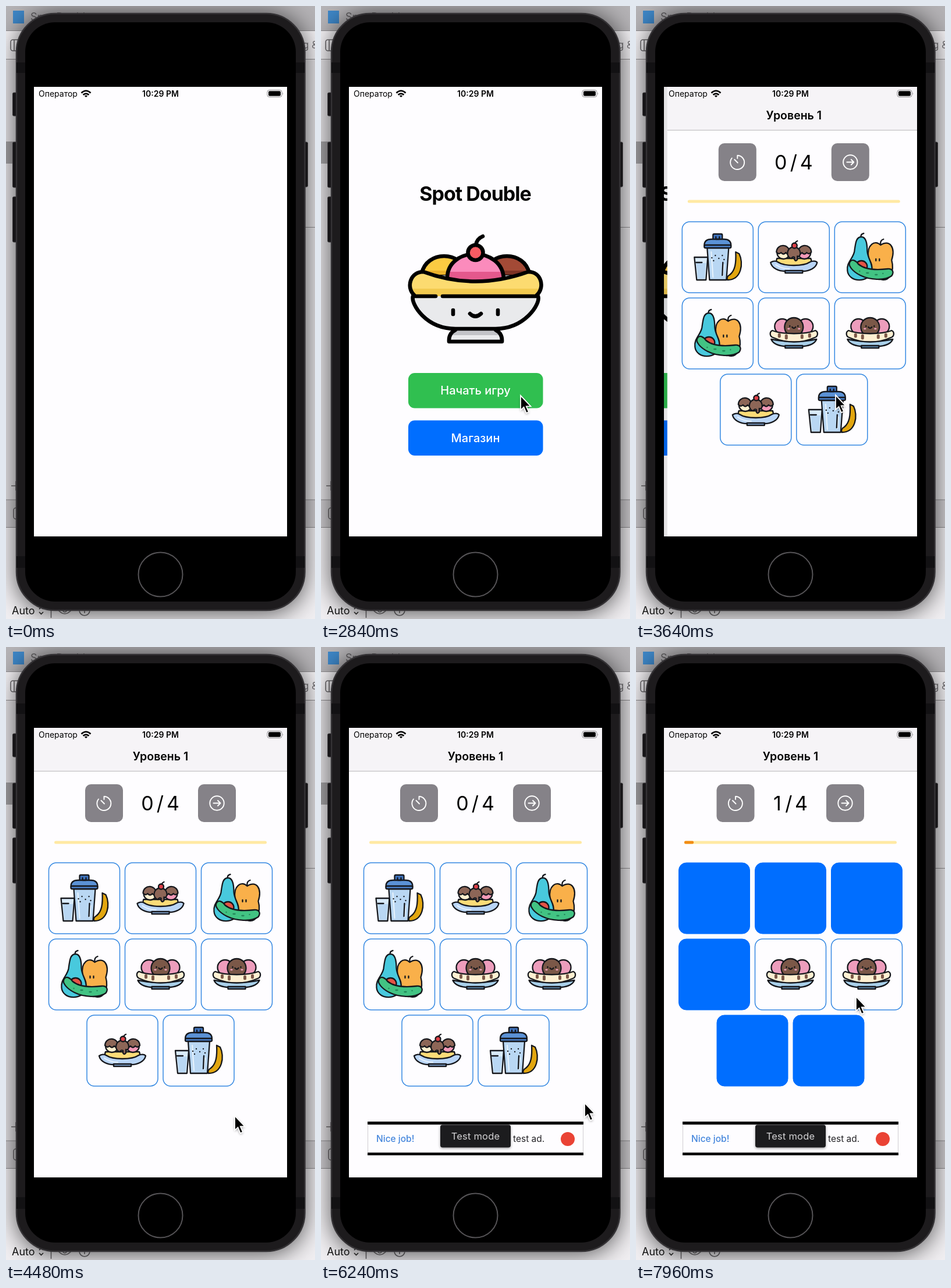
An HTML page for the animation above (8 s loop, 531x1054 px).

```html
<!DOCTYPE html>
<html lang="ru">
<head>
<meta charset="utf-8">
<title>Memory game</title>
<style>
  html, body { margin: 0; width: 100%; height: 100%; overflow: hidden; background: #e4e2e5; }
  svg { display: block; width: 100%; height: 100%; font-family: Inter, Roboto, sans-serif; }
  .mid { text-anchor: middle; }
  .ink { stroke: #15171c; stroke-width: 2.3; stroke-linejoin: round; stroke-linecap: round; }
  .bold { stroke: #000; stroke-width: 6.6; stroke-linejoin: round; stroke-linecap: round; }
  .line { fill: none; }
  .sym { fill: none; stroke: #fff; stroke-width: 1.9; stroke-linecap: round; stroke-linejoin: round; }
</style>
</head>
<body>
<svg viewBox="0 0 531 1054">
  <defs>
    <filter id="blur" x="-30%" y="-20%" width="160%" height="140%"><feGaussianBlur stdDeviation="21"/></filter>
    <filter id="soft" x="-50%" y="-50%" width="200%" height="200%"><feGaussianBlur stdDeviation="2"/></filter>
    <clipPath id="screen"><rect x="48" y="139" width="435" height="773"/></clipPath>
    <clipPath id="scoop"><path d="M217 470C215 412 313 412 314 470Q265 484 217 470Z"/></clipPath>
    <clipPath id="fruit"><path d="M176 457Q265 490 356 457C386 455 388 499 360 499H172C144 499 146 455 176 457Z"/></clipPath>

    <g id="shaker" class="ink">
      <path fill="#d9ebfa" d="M-40 0H-17L-20 39H-36Z"/>
      <path fill="#b9d7f3" stroke="none" d="M-37 10H-20L-22 37H-34Z"/>
      <path class="line" d="M-37 9H-27"/>
      <path fill="#e2a60f" d="M31 -9L37 -6C45 10 41 39 17 39C15 36 17 32 21 30C30 23 32 10 31 -9Z"/>
      <path fill="#b9d7f3" d="M-18 -16H19L15 39H-14Z"/>
      <path class="line" stroke="#e4f1fc" d="M-11 -9L-8 34M11 13L9 32"/>
      <path class="line" d="M-10 1h.1M-4 -3h.1M2 2h.1M8 -3h.1M-7 6h.1M11 4h.1M9 9L8 31"/>
      <rect x="-8" y="-40" width="16" height="11" rx="2" fill="#3f73bd"/>
      <path fill="#5b92d6" d="M-23 -20C-23 -29 -17 -31 -11 -31H11C17 -31 23 -29 23 -20Z"/>
      <rect x="-23" y="-21" width="46" height="5" rx="2" fill="#4a80c8"/>
      <path class="line" d="M-3 -35V-31H3V-35"/>
    </g>

    <g id="sundae" class="ink">
      <path fill="#fbdc78" d="M-29 2C-34 14 -20 17 0 17S34 14 29 2Z"/>
      <circle cx="-18" cy="-8" r="11" fill="#fff0cf"/>
      <circle cx="18" cy="-8" r="11" fill="#f39ab8"/>
      <path fill="#8d6657" d="M-30 -9C-29 -24 -8 -24 -7 -8Q-11 -4 -14 -8Q-18 -3 -22 -8Q-26 -4 -30 -9Z"/>
      <path fill="#8d6657" d="M30 -9C29 -24 8 -24 7 -8Q11 -4 14 -8Q18 -3 22 -8Q26 -4 30 -9Z"/>
      <path fill="#8d6657" d="M-11 -5C-12 -22 12 -22 11 -5Q8 1 6 -2V4Q3 8 1 4V0Q-2 -2 -4 2Q-9 2 -11 -5Z"/>
      <circle cx="1" cy="-20" r="4.5" fill="#dd4048"/>
      <path class="line" d="M2 -24Q3 -27 6 -28"/>
      <path fill="#b9d5f6" d="M-40 9C-36 6 -31 6 -28 8C-16 16 16 16 28 8C32 6 38 6 40 9C38 19 26 24 15 24H-15C-26 24 -38 19 -40 9Z"/>
      <path class="line" stroke="#e2effd" d="M-31 13Q-20 20 -8 20"/>
      <path fill="#8fb5e4" d="M-15 23H15V27H-15Z"/>
    </g>

    <g id="veg" class="ink">
      <path fill="#f9b04a" d="M18 -21C8 -31 -6 -21 -3 0C-4 25 4 40 18 38C34 43 42 23 37 5C44 -17 34 -31 18 -21Z"/>
      <path class="line" d="M18 -22Q17 -29 23 -31M10 3V6M16 3V6"/>
      <path fill="#48c9dd" d="M-15 -35C-24 -35 -25 -25 -27 -10C-29 2 -41 9 -39 23C-37 44 -1 45 3 23C5 9 -4 4 -5 -11C-5 -25 -7 -35 -15 -35Z"/>
      <path class="line" d="M-16 -35Q-16 -40 -11 -41"/>
      <circle cx="-15" cy="16" r="10" fill="#e55345"/>
      <path fill="#42c383" d="M-34 7C-40 14 -29 25 -17 31C-1 39 25 41 37 32C42 25 38 19 30 20C14 22 -8 22 -20 12C-25 5 -31 3 -34 7Z"/>
      <path class="line" stroke="#24875a" d="M-18 24h.1M-6 27h3M9 30h3M22 28h.1"/>
    </g>

    <g id="split" class="ink">
      <circle cx="-20" cy="-12" r="13" fill="#ed9dbc"/>
      <circle cx="20" cy="-12" r="13" fill="#ed9dbc"/>
      <circle cy="-11" r="16" fill="#7b5848"/>
      <path class="line" d="M-7 -13v1M7 -13v1M-3 -11Q0 -7 3 -11"/>
      <path class="line" stroke="#ed9dbc" d="M-10 -8h2M8 -8h2"/>
      <path fill="#a9d0ea" d="M-39 10Q0 18 39 10Q35 20 17 22H-17Q-35 20 -39 10Z"/>
      <path fill="#fff0d2" d="M-37 -5C-42 -3 -42 5 -36 7C-15 17 15 17 36 7C42 5 42 -3 37 -5C20 2 -20 2 -37 -5Z"/>
      <path class="line" stroke="#7b5848" stroke-width="5" d="M-25 2V5M-13 4V8M14 4V7M27 2V5"/>
      <path fill="#6f9fc6" d="M-15 21H15V25H-15Z"/>
    </g>
  </defs>

  <!-- desktop window behind the phone -->
  <rect width="531" height="1054" fill="#e4e2e5"/>
  <rect width="531" height="42" fill="#b4b2b5"/>
  <rect y="43" width="531" height="48" fill="#f3f1f4"/>
  <rect y="849" width="531" height="47" fill="#cfcdd0"/>
  <rect y="897" width="531" height="157" fill="#f0eef1"/>
  <path d="M0 42.5H531M0 91.5H531M514 380.5H531M0 849H531M0 896.5H531" stroke="#8c8a8d"/>
  <rect y="233" width="20" height="38" fill="#a19fa2"/>
  <rect x="12" y="8" width="19" height="22" fill="#3e86c6"/>
  <text x="42" y="25" font-size="18" fill="#626063">Spot Double</text>
  <text x="510" y="73" font-size="17" fill="#747276">g &amp;</text>
  <g fill="none" stroke="#69676a" stroke-width="1.6">
    <rect x="8" y="58" width="20" height="19" rx="4"/><path d="M14 58V77M9 825H25M17 817V833"/>
    <rect x="13" y="863" width="18" height="19" rx="4"/>
    <path d="M77.5 1025V1052M90 1039Q101 1027 112 1039Q101 1051 90 1039Z"/>
    <circle cx="101" cy="1039" r="3"/><circle cx="135" cy="1039" r="9"/><path d="M135 1037V1044"/>
  </g>
  <rect x="18" y="14" width="496" height="1030" rx="66" fill="#000" opacity=".66" filter="url(#blur)"/>
  <text x="10" y="1046" font-size="18" fill="#111">Auto</text>
  <path d="M57 1037L60.500 1033.500L64 1037M57 1042L60.500 1045.500L64 1042" fill="none" stroke="#222" stroke-width="1.7"/>

  <!-- phone -->
  <g fill="#161517" stroke="#39373a">
    <rect x="11.500" y="149" width="10" height="40" rx="2"/>
    <rect x="11.500" y="234" width="10" height="78" rx="2"/>
    <rect x="11.500" y="328" width="10" height="78" rx="2"/>
    <rect x="508" y="234" width="10.500" height="77" rx="2"/>
  </g>
  <rect x="18" y="13" width="495.500" height="1026" rx="66" fill="#1d1b1d" stroke="#343235" stroke-width="2.500"/>
  <path d="M18 97H33V115H18ZM498 97H513V115H498ZM18 946H33V966H18ZM498 946H513V966H498Z" fill="#121113"/>
  <rect x="33" y="28" width="465" height="996" rx="51"/>
  <circle cx="265.500" cy="977.500" r="38" fill="none" stroke="#565457" stroke-width="2"/>

  <g clip-path="url(#screen)">
    <rect x="48" y="139" width="435" height="773" fill="#fefdff"/>
    <g id="menu">
      <text class="mid" x="265" y="335" font-size="34" font-weight="700" letter-spacing="-1">Spot Double</text>
      <g class="bold">
        <path fill="#fbcb42" d="M173 460C181 420 242 420 250 460Z"/>
        <path fill="#a34a36" d="M281 460C289 420 350 420 358 460Z"/>
        <path stroke="none" fill="#eab12c" d="M181 455H230V462H181Z"/>
        <path stroke="none" fill="#7d3325" d="M300 455H350V462H300Z"/>
      </g>
      <g clip-path="url(#scoop)"><rect x="210" y="415" width="110" height="42" fill="#fb8bbc"/><rect x="210" y="457" width="110" height="25" fill="#e4588c"/></g>
      <path class="bold line" d="M217 470C215 412 313 412 314 470"/>
      <g clip-path="url(#fruit)"><rect x="148" y="450" width="235" height="37" fill="#fcdb70"/><rect x="148" y="486" width="235" height="14" fill="#f2ca50"/></g>
      <path class="bold line" d="M160 497C146 484 153 457 176 457Q265 490 356 457C379 457 385 484 371 497"/>
      <path fill="#e9eaec" d="M156 499H375C378 512 350 555 300 555H231C180 555 154 512 156 499Z"/>
      <path fill="#e9eaec" d="M231 557Q219 563 220 577H311Q312 563 300 557Z"/>
      <path fill="#c2c3c7" d="M231 557L223 566H308L300 557Z"/>
      <g class="bold line">
        <path d="M197 499H158C154 512 180 555 231 555H300C350 555 378 512 373 499H209"/>
        <path d="M231 557Q219 563 220 577H311Q312 563 300 557M227 523V530M304 523V530M256 529Q265 538 275 529"/>
        <path d="M266 411Q268 400 278 396"/>
      </g>
      <circle class="bold" cx="265.500" cy="424" r="13" fill="#fa5b62"/>
      <g class="mid" font-size="20" font-weight="500">
        <rect x="150" y="631" width="231.500" height="60.500" rx="11" fill="#30bf50"/>
        <text x="265.500" y="668" fill="#fff">Начать игру</text>
        <rect x="150" y="712.500" width="231.500" height="60.500" rx="11" fill="#006eff"/>
        <text x="265.500" y="750" fill="#fff">Магазин</text>
      </g>
    </g>
    <rect id="dim" x="48" y="139" width="435" height="773" opacity="0"/>

    <g id="game">
      <rect x="48" y="139" width="435" height="773" fill="#fefdff"/>
      <rect x="48" y="139" width="435" height="74" fill="#f6f4f7"/>
      <path d="M48 213.500H483" stroke="#b9b7ba"/>
      <text class="mid" x="265.500" y="195" font-size="19.500" font-weight="600">Уровень 1</text>
      <g id="timer">
        <rect x="136" y="236" width="65" height="65" rx="10" fill="#858288"/>
        <path class="sym" d="M168.500 262V257A12 12 0 1 1 159 261.500M163.500 264L169 269.500"/>
      </g>
      <g id="next">
        <rect x="330" y="236" width="65" height="65" rx="10" fill="#858288"/>
        <circle class="sym" cx="362.500" cy="268.500" r="12.200"/>
        <path class="sym" d="M356.500 268.500H368.500M364 264L368.500 268.500L364 273"/>
      </g>
      <g class="mid" font-size="34">
        <text id="found" x="243" y="281">0</text><text id="slash" x="265" y="281">/</text><text id="total" x="287" y="281">4</text>
      </g>
      <rect x="83" y="333.500" width="365" height="5" rx="2.500" fill="#ffe9a3"/>
      <rect id="bar" x="83" y="333.500" height="5" rx="2" fill="#f28c13"/>
      <g id="cards"></g>
      <g id="ad">
        <rect x="80" y="816" width="371" height="58"/>
        <rect x="80.500" y="821.500" width="370" height="47.500" fill="#fefdff" stroke="#d0ced1"/>
        <text x="95" y="851" font-size="15.500" font-weight="500" fill="#4385dc">Nice job!</text>
        <text x="330" y="851" font-size="15.500" fill="#242327">test ad.</text>
        <circle cx="424" cy="846" r="12" fill="#ea4335"/>
        <rect x="205" y="823" width="121" height="39" rx="4" opacity=".4" filter="url(#soft)"/>
        <rect x="205" y="821.500" width="121" height="39" rx="4" fill="#1c1c1e"/>
        <text class="mid" x="265.500" y="847" font-size="16.500" letter-spacing=".2" fill="#d4d3d5">Test mode</text>
      </g>
    </g>

    <text x="56" y="156" font-size="14">Оператор</text>
    <text class="mid" x="265.500" y="156" font-size="14" font-weight="600">10:29 PM</text>
    <g fill="none" stroke="#000" stroke-width="2.600">
      <path d="M129.500 149.500Q137.500 142 145.500 149.500M132.500 152.800Q137.500 148.500 142.500 152.800"/>
      <path d="M137.500 157L134.800 154.500Q137.500 152.500 140.200 154.500Z" fill="#000" stroke="none"/>
    </g>
    <rect x="449" y="144.500" width="25" height="12" rx="3.500" fill="none" stroke="#8f8d90"/>
    <rect x="451" y="146.300" width="21" height="8.400" rx="2"/>
    <path d="M475.500 148.500Q477 150.500 475.500 152.500Z" fill="#8f8d90"/>
  </g>

  <g id="cursor">
    <path d="M0 2V27L5.500 22L9.500 32L14 30L10 20.500H17.500Z" opacity=".4" filter="url(#soft)"/>
    <path d="M0 0V25L5.500 20L9.700 30L14 28.200L9.800 18.500H17.500Z" stroke="#fff" stroke-width="1.800"/>
  </g>
</svg>
<script>
const LOOP = 8000;
const MENU_AT = 480, PUSH_AT = 3200, AD_AT = 4920, HIDE_AT = 6640, MATCH_AT = 7800, FLIP = 300;
const $ = id => document.getElementById(id);
const clamp = x => Math.min(1, Math.max(0, x));
const ease = x => x * x * (3 - 2 * x);
const move = (el, x, y = 0) => el.setAttribute('transform', `translate(${x} ${y})`);
const show = (el, on) => el.setAttribute('visibility', on ? 'inherit' : 'hidden');

const faces = ['shaker', 'sundae', 'veg', 'veg', 'split', 'split', 'sundae', 'shaker'];
const openAt = { 4: 7200, 5: 7500 };
const cards = faces.map((face, i) => {
  const x = i < 6 ? 134.5 + 131 * (i % 3) : 200 + 131 * (i - 6);
  const y = 432 + 131 * Math.floor(i / 3);
  const box = style => `<rect x="-61" y="-61" width="122" height="122" rx="13" ${style}/>`;
  const el = document.createElementNS('http://www.w3.org/2000/svg', 'g');
  el.innerHTML = `<g>${box('fill="#fefdff" stroke="#3488e2" stroke-width="1.5"')}<use href="#${face}"/></g>` +
    box('fill="#006eff" stroke="#006eff"');
  $('cards').append(el);
  return { el, x, y, front: el.firstChild, back: el.lastChild, openAt: openAt[i] ?? Infinity };
});

// time, x, y of the pointer tip
const path = [
  [1080, 540, 800], [2000, 400, 705], [2600, 343, 670], [3720, 343, 669], [4360, 393, 806],
  [5000, 393, 806], [5560, 453, 784], [6300, 453, 784], [6960, 325, 634], [7160, 276, 590],
  [7260, 276, 590], [7480, 378, 601], [8000, 378, 601]
];

function pointer(t) {
  const i = path.findIndex(p => p[0] > t);
  if (i < 1) return [path[0][1], path[0][2]];
  const a = path[i - 1], b = path[i];
  const k = ease((t - a[0]) / (b[0] - a[0]));
  return [a[1] + (b[1] - a[1]) * k, a[2] + (b[2] - a[2]) * k];
}

function drawCard(c, t) {
  const hide = ease(clamp((t - HIDE_AT) / FLIP));
  const open = ease(clamp((t - c.openAt) / FLIP));
  const turn = hide - open;
  c.el.setAttribute('transform', `translate(${c.x} ${c.y}) scale(${Math.abs(Math.cos(turn * Math.PI))} 1)`);
  show(c.front, turn < 0.5);
  show(c.back, turn >= 0.5);
}

function draw(t) {
  const s = Math.max(0, t - PUSH_AT) / 1000 * 14.3;
  const rest = (1 + s) * Math.exp(-s);
  const off = rest < 0.002 ? 0 : rest * 435;
  $('menu').setAttribute('opacity', clamp((t - MENU_AT) / 240));
  move($('menu'), -130 * (1 - rest));
  $('dim').setAttribute('opacity', 0.1 * (1 - rest));
  move($('game'), off);
  show($('game'), t >= PUSH_AT);
  show($('ad'), t >= AD_AT);

  const matched = t >= MATCH_AT;
  $('found').textContent = matched ? 1 : 0;
  $('slash').setAttribute('x', matched ? 262.5 : 265);
  $('total').setAttribute('x', matched ? 284 : 287);
  move($('timer'), matched ? 2.5 : 0);
  move($('next'), matched ? -3 : 0);

  $('bar').setAttribute('width', Math.max(0, (t - HIDE_AT) / 30000 * 365));
  cards.forEach(c => drawCard(c, t));
  move($('cursor'), ...pointer(t));
}

const start = performance.now();
function tick() {
  draw((performance.now() - start) % LOOP);
  requestAnimationFrame(tick);
}
tick();
</script>
</body>
</html>
```
